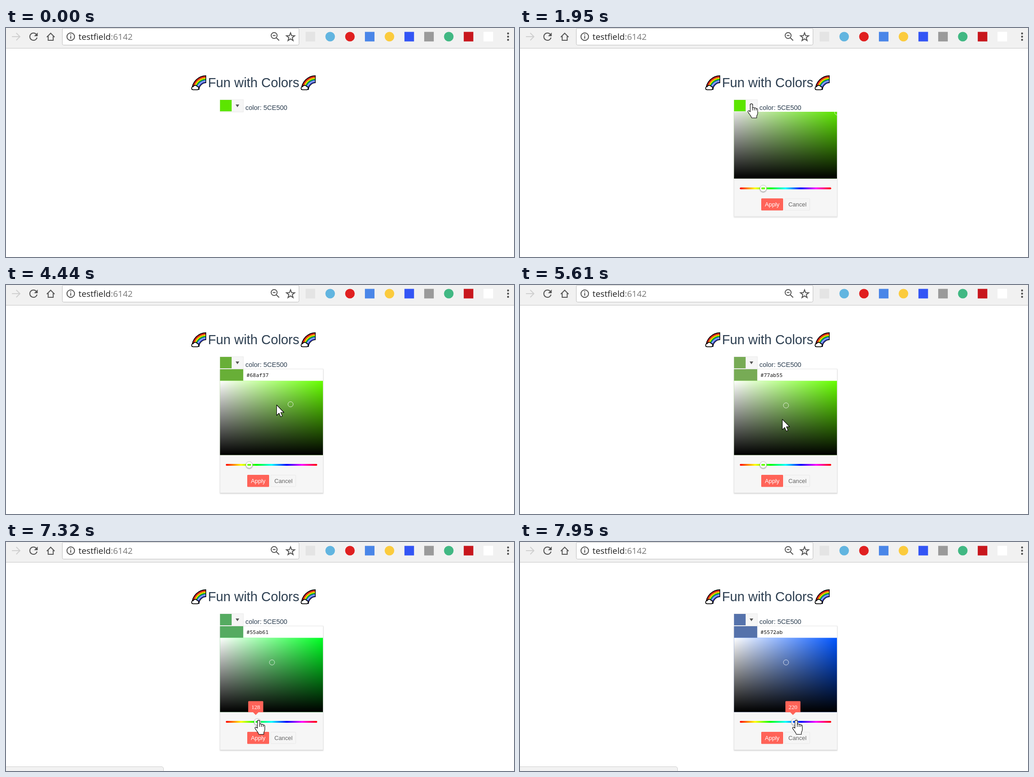
These frames come from a looping animation (1114 px wide and 503 px high, 8 s). An HTML page:

```html
<!DOCTYPE html>
<html lang="en">
<head>
<meta charset="utf-8">
<title>Color picker</title>
<style>
  html, body { margin: 0; width: 100%; height: 100%; overflow: hidden; background: #fff; }
  svg { display: block; width: 1114px; height: 503px; }
  text { font-family: "Liberation Sans", Arial, sans-serif; }
  .address { font: 18.8px "Open Sans", "Noto Sans", sans-serif; }
  .hex { font: 11.5px "Noto Sans Mono", "DejaVu Sans Mono", monospace; }
  .tip { font: 12.6px "Liberation Serif", "Times New Roman", serif; }
  .icon { fill: none; stroke: #555; stroke-width: 2; }
</style>
</head>
<body>
<svg viewBox="0 0 1114 503">
  <defs>
    <linearGradient id="white">
      <stop stop-color="#fff"/><stop offset="1" stop-color="#fff" stop-opacity="0"/>
    </linearGradient>
    <linearGradient id="black" x2="0" y2="1">
      <stop stop-opacity="0"/><stop offset="1"/>
    </linearGradient>
    <linearGradient id="hues"/>
    <filter id="shadow" x="-20%" y="-20%" width="140%" height="150%">
      <feDropShadow dx="0" dy="1.5" stdDeviation="1.3" flood-opacity=".18"/>
    </filter>
    <filter id="thumbShadow" x="-50%" y="-50%" width="200%" height="200%">
      <feDropShadow dx="0" dy="1" stdDeviation="1" flood-opacity=".5"/>
    </filter>
    <clipPath id="opening"><rect x="467" y="184" width="230" height="300"/></clipPath>
    <clipPath id="bowBox"><rect width="33" height="32"/></clipPath>
    <g id="rainbow">
      <g id="bow" clip-path="url(#bowBox)" fill="none"></g>
      <path d="M4.500 31.600a3.400 3.400 0 0 1 0-6.800 4.800 4.800 0 0 1 8.600-.4 3.700 3.700 0 0 1 1 7.200Z" fill="#fff" stroke="#000" stroke-width="1.700"/>
    </g>
  </defs>

  <!-- browser bar -->
  <path d="M0 0H1114V44H0Z" fill="#f1f1f1"/>
  <path d="M0 44.5H1114" stroke="#c4c4c4"/>
  <rect x="123.5" y=".5" width="519" height="37" rx="3" fill="#fff" stroke="#bdbdbd"/>
  <path class="icon" d="M13 19H30M22.5 11L30.5 19 22.5 27" style="stroke:#cfcfcf"/>
  <path class="icon" d="M66.5 14A8 8 0 1 0 68 21"/>
  <path d="M69.5 10V18H61.5Z" fill="#555"/>
  <path class="icon" d="M89.5 20L98 11.5 106.5 20M92.5 18V27H103.5V18"/>
  <circle class="icon" cx="142" cy="19" r="8.3"/>
  <path class="icon" d="M142 17.5V23.5M142 13.8V15.8"/>
  <text class="address" x="159" y="26" fill="#222">testfield<tspan fill="#777">:6142</tspan></text>
  <circle class="icon" cx="588" cy="16.5" r="6.5"/>
  <path class="icon" d="M592.8 21.5L599 27.5M585 16.5H591"/>
  <path class="icon" id="star"/>
  <g id="extensions"></g>
  <path d="M1101 12h0M1101 19h0M1101 26h0" stroke="#555" stroke-width="4.4" stroke-linecap="round"/>

  <!-- page -->
  <use href="#rainbow" x="406" y="104"/>
  <use href="#rainbow" x="646" y="104"/>
  <text x="443" y="130" font-size="28.8" fill="#2c3e50">Fun with Colors</text>
  <rect x="469.5" y="157.5" width="51" height="27" fill="#f6f6f6" stroke="#e9e9e9"/>
  <rect class="swatch" x="469.3" y="158" width="25.5" height="25"/>
  <path d="M503.5 168H511.5L507.5 174Z" fill="#555"/>
  <text x="525" y="180" font-size="14.5" fill="#2c3e50">color: 5CE500</text>

  <g id="clip"><g id="popup">
    <rect x="469.5" y="184.5" width="226" height="272" fill="#f6f6f6" stroke="#e6e6e6" filter="url(#shadow)"/>
    <rect x="520" y="185" width="175" height="25.5" fill="#fff"/>
    <rect class="swatch" x="469.3" y="185" width="51" height="25.5"/>
    <text class="hex" id="hex" x="527.5" y="202" fill="#111"></text>
    <path class="area" id="hueArea"/>
    <path class="area" fill="url(#white)"/>
    <path class="area" fill="url(#black)"/>
    <circle id="ring" r="5.7" fill="none" stroke="#fff" stroke-opacity=".8"/>
    <rect x="482" y="393" width="200.5" height="4" rx="2" fill="url(#hues)"/>
    <g id="thumb">
      <circle cy="395" r="7" fill="#fff" stroke="#bbb" stroke-width=".8" filter="url(#thumbShadow)"/>
      <rect id="thumbColor" x="-4" y="393" width="8" height="4" rx="1"/>
    </g>
    <rect x="529" y="417" width="48" height="26.5" rx="1.5" fill="#ff6358"/>
    <text x="537" y="434.5" font-size="12.8" fill="#fff">Apply</text>
    <rect x="580.5" y="417.5" width="55" height="25.5" rx="1.5" fill="#f5f5f5" stroke="#e9e9e9"/>
    <text x="588.5" y="434.5" font-size="12.8" fill="#656565">Cancel</text>
  </g></g>

  <g id="tooltip">
    <path d="M-16.5 351a1.5 1.5 0 0 1 1.5-1.5H15a1.5 1.5 0 0 1 1.5 1.5V374H6L0 380 -6 374H-16.5Z" fill="#ff6358"/>
    <text class="tip" id="tipText" y="366.5" text-anchor="middle" fill="#fff"></text>
  </g>
  <path id="status" d="M-2 493.5H341a4.5 4.5 0 0 1 4.5 4.5V506H-2Z" fill="#f2f2f2" stroke="#cfcfcf"/>

  <g id="cursor" fill="#fff" stroke="#000" stroke-width="1.1" stroke-linejoin="round">
    <path id="arrow" d="M.5 .5V23.5L5.8 18.5 9.3 26.5 13 24.8 9.5 17H16.5Z"/>
    <g id="hand">
      <path d="M-2.6 18V3a2.6 2.6 0 0 1 5.2 0V9.5c.8-1.6 3.6-1.4 4 .6 1-1.2 3.4-.8 3.8 1.2 1.4-.9 3.3 0 3.3 2V21c0 3-1.7 4.5-2.2 6.500V31.5H.5c-.5-3-2.5-5-5-8.500-1.5-2.5-4.3-5-3.2-6.500 1.2-1.6 3.6-.6 5.1 1.5Z"/>
      <path d="M2.6 9V15M6.6 10.5V15M10.4 12V15" fill="none"/>
    </g>
  </g>
</svg>
<script>
const LOOP = 8000, STEP = 78;
const OPEN = 1870, FIRST_PICK = 3740, SECOND_PICK = 4830, STATUS = 6870, DRAG = 7240;
const START = { x: 900, y: 512, hue: 96 };

// Pointer moves: first and last update, where it ends, hue it drags to
const moves = [
  [410, 1190, 509, 176], [1270, 1420, 507.5, 166], [2560, 3020, 613, 231], [3110, 3430, 624, 262],
  [4440, 4440, 593, 263], [4510, 4510, 584, 265], [5520, 6320, 545, 388], [6410, 6570, 538, 388],
  [6640, 6700, 535.5, 391], [DRAG, 7950, 605.5, 391, 220]
].map(([from, to, x, y, hue = START.hue]) => ({ from, to, x, y, hue }));

const $ = id => document.getElementById(id);
const show = (el, on) => el.setAttribute('visibility', on ? 'visible' : 'hidden');
const place = (el, x, y = 0) => el.setAttribute('transform', `translate(${x} ${y})`);
const easeOut = (p, power) => 1 - (1 - p) ** power;

// Share of a move done at time t, in even held steps; the first step already moves
function progress(t, from, to) {
  if (t < from) return 0;
  const n = Math.round((to - from) / STEP);
  const k = t >= to ? n : Math.floor((t - from) / (to - from) * n + 1e-6);
  return (k + 1) / (n + 1);
}

function pointerAt(t) {
  const pos = { ...START };
  for (const m of moves) {
    const p = easeOut(progress(t, m.from, m.to), 1.36);
    for (const key in pos) pos[key] += (m[key] - pos[key]) * p;
  }
  return pos;
}

function hueHex(hue, low = 0, high = 255) {
  const channel = n => {
    const k = (n + hue / 60) % 6;
    const v = high - (high - low) * Math.max(0, Math.min(k, 4 - k, 1));
    return Math.round(v).toString(16).padStart(2, '0');
  };
  return '#' + channel(5) + channel(3) + channel(1);
}

function build() {
  $('hues').innerHTML = Array.from({ length: 7 }, (_, i) =>
    `<stop offset="${i / 6}" stop-color="${hueHex(i * 60)}"/>`).join('');

  document.querySelectorAll('.area').forEach(el => el.setAttribute('d', 'M469.3 210.5H695V373.5H469.3Z'));

  const arc = (r, width, color) =>
    `<circle cx="33" cy="32" r="${r}" stroke="${color}" stroke-width="${width}"/>`;
  const bands = ['#e81224', '#f7830c', '#fff100', '#16c60c', '#2468e8', '#b4ccff', '#3b45d0'];
  $('bow').innerHTML = arc(23.5, 17, '#000') +
    bands.map((color, i) => arc(29.3 - i * 2, 2.1, color)).join('') +
    '<path d="M32.3 0V17" stroke="#000" stroke-width="1.5"/>';

  $('star').setAttribute('d', 'M' + Array.from({ length: 10 }, (_, i) => {
    const r = i % 2 ? 4 : 9.5, a = (i / 5 - .5) * Math.PI;
    return `${624 + r * Math.cos(a)} ${20 + r * Math.sin(a)}`;
  }).join('L') + 'Z');

  const squares = ['#e4e4e4', '#4a86e8', '#3355f5', '#9a9a9a', '#c8171d', '#ffffff'];
  $('extensions').innerHTML = ['#e4e4e4', '#62b5e0', '#e02020', '#4a86e8', '#fbcb3d',
    '#3355f5', '#9a9a9a', '#41b883', '#c8171d', '#ffffff'].map((color, i) => {
    const x = 667.5 + i * 43.35;
    return `<rect x="${x - 10.5}" y="8.5" width="21" height="21" rx="${squares.includes(color) ? 0 : 10.5}" fill="${color}"/>`;
  }).join('');
}

function draw(t) {
  const { x, y, hue } = pointerAt(t);
  const dragging = t >= DRAG;

  const color = t < FIRST_PICK ? '#5ce500' : t < SECOND_PICK ? '#68af37'
    : dragging ? hueHex(hue, 85, 171) : '#77ab55';
  document.querySelectorAll('.swatch').forEach(el => el.setAttribute('fill', color));
  $('hex').textContent = color;
  $('hueArea').setAttribute('fill', hueHex(hue));
  $('thumbColor').setAttribute('fill', hueHex(hue));

  const ring = t < FIRST_PICK ? [695.5, 228] : t < SECOND_PICK ? [624, 262] : [583.3, 264.5];
  place($('ring'), ...ring);
  const thumbX = 480 + hue / 1.8;
  place($('thumb'), thumbX);
  show($('tooltip'), dragging);
  place($('tooltip'), thumbX - 3.7);
  $('tipText').textContent = Math.round(hue);

  const opened = easeOut(progress(t, OPEN, OPEN + 160), 1.69);
  show($('popup'), opened > 0);
  place($('popup'), 0, 273 * (opened - 1));
  $('clip').setAttribute('clip-path', opened < 1 ? 'url(#opening)' : 'none');
  $('status').setAttribute('opacity', progress(t, STATUS, STATUS + 80));

  const hand = t >= 1270 && t < 2640 || t >= 6640;
  show($('arrow'), t >= 410 && !hand);
  show($('hand'), hand);
  place($('cursor'), x, y);
}

build();
let start;
function frame(now) {
  start ??= now;
  draw((now - start) % LOOP);
  requestAnimationFrame(frame);
}
draw(0);
requestAnimationFrame(frame);
</script>
</body>
</html>
```
